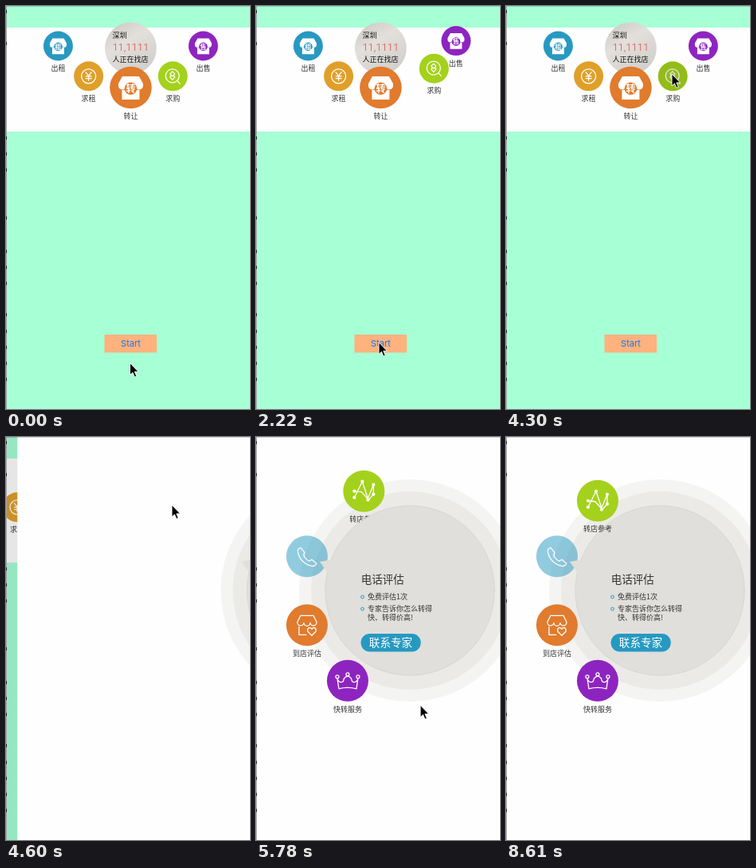
These frames come from a looping animation (306x504 px, 8710 ms). An HTML page:

```html
<!DOCTYPE html>
<html lang="zh">
<head>
<meta charset="utf-8">
<style>
html, body { margin: 0; width: 100%; height: 100%; overflow: hidden; background: #fff; }
svg { display: block; width: 306px; height: 504px; }
text { font-family: "Noto Sans CJK SC", "Noto Sans CJK", sans-serif; fill: #333; }
.mid { text-anchor: middle; }
.latin { font-family: Inter, Roboto, sans-serif; }
.count { font-family: Roboto, Inter, sans-serif; }
.line { fill: none; stroke: #fff; stroke-width: 1.3; stroke-linecap: round; stroke-linejoin: round; }
</style>
</head>
<body>
<svg id="stage" viewBox="0 0 306 504"></svg>
<script>
const LOOP = 8710, TICK = 148, WIDTH = 306;
const BLUE = '#2799c1', GOLD = '#e09f29', ORANGE = '#e17b2d', GREEN = '#a4d11c', PURPLE = '#8e24c0';

const circle = (x, y, r, fill, extra = '') => `<circle cx="${x}" cy="${y}" r="${r}" fill="${fill}" ${extra}/>`;
const rect = (x, y, w, h, fill, extra = '') => `<rect x="${x}" y="${y}" width="${w}" height="${h}" fill="${fill}" ${extra}/>`;
const text = (x, y, size, str, extra = '') => `<text x="${x}" y="${y}" font-size="${size}" ${extra}>${str}</text>`;
const line = (d, extra = '') => `<path class="line" d="${d}" ${extra}/>`;
const dots = (points, r) => points.map(([x, y]) => circle(x, y, r, '#fff')).join('');

const shop = (char, color, scale) => `<g transform="scale(${scale})">
  <path fill="#fff" d="M-10.5-14H10.5L15.5-5V-2A5.1 4.5 0 0 1 5.2-2A5.2 4.5 0 0 1-5.2-2A5.1 4.5 0 0 1-15.5-2V-5ZM-11 3H11V15H-11Z"/>
  ${circle(0, 1.2, 7.8, color)}
  ${text(0, 5.5, 12, char, 'class="mid" font-weight="700" style="fill:#fff"')}</g>`;
const yen = circle(0, 0, 9, 'none', 'class="line"') + line('M-3.5-5L0-.5L3.5-5M0-.5V5.5M-3.5 0H3.5M-3.5 2.7H3.5');
const search = circle(-.5, -.5, 8.5, 'none', 'class="line"') +
  line('M5.5 5.5L9 9.5M-.5-6L2.5-3L-.5 0L-3.5-3ZM-2-1.5L-3.5 1L-.5 4.5L2.5 1L1-1.5');
const chart = line('M-12 8L-2-12L5 9L12-8V4L6 11L-3 1L-12 0') +
  dots([[-12, 8], [-2, -12], [5, 11], [12, -8], [12, 4], [-12, 0]], 2.1);
const phone = line('M-8-11L-3-5Q-5-2-3 1Q0 5 3 6L6 4L12 9Q10 13 6 12Q-3 10-8 3Q-13-5-11-9Z');
const heartShop = line('M-8-12H8L12-4A4 4 0 0 1 4-3A4 4 0 0 1-4-3A4 4 0 0 1-12-4ZM-10 2V12H-1') +
  line('M6 13L1 8Q0 4 3 3Q5 3 6 5Q7 3 9 3Q12 4 11 8Z');
const crown = line('M-11 10L-13-3C-11 3-6 3-5-1C-5-4-2-5 0-6C2-5 5-4 5-1C6 3 11 3 13-3L11 10Q0 7-11 10Z') +
  [[-13, -5], [0, -8], [13, -5]].map(([x, y]) => circle(x, y, 2, 'none', 'class="line"')).join('');

// Angles are in degrees, clockwise on screen from the right.
const homeArc = { x: 156.4, y: -3.6, r: 105.6, from: -90, duration: 500 };
const serviceArc = { x: 195.5, y: 192.3, r: 138.4, from: 360, duration: 500 };
const homeItems = [
  { label: '出租', r: 18.5, color: BLUE, art: shop('租', BLUE, .68), to: 149.5, start: 1200 },
  { label: '求租', r: 18.5, color: GOLD, art: yen, to: 120, start: 1360 },
  { label: '求购', r: 18.5, color: GREEN, art: search, to: 60, start: 1803 },
  { label: '出售', r: 18.5, color: PURPLE, art: shop('售', PURPLE, .68), to: 30.5, start: 1781 },
  { label: '转让', r: 26.3, color: ORANGE, art: shop('转', ORANGE, 1), to: 90, start: 1520 },
];
const serviceItems = [
  { label: '转店参考', r: 26, color: GREEN, art: chart, to: 234.4, start: 5370 },
  { label: '', r: 26, color: BLUE, art: phone, to: 198.1, start: 5138, opacity: .5 },
  { label: '到店评估', r: 26, color: ORANGE, art: heartShop, to: 161.9, start: 4946 },
  { label: '快转服务', r: 26, color: PURPLE, art: crown, to: 125.6, start: 4760 },
];
const icon = i => `<g class="icon" opacity="${i.opacity || 1}">${circle(0, 0, i.r, i.color)}${i.art}
  ${text(0, i.r + 12.7, 9, i.label, 'class="mid"')}</g>`;

const bullet = y => circle(133.5, y, 1.9, 'none', `stroke="${BLUE}"`);
const edgeMarks = [7, 47, 165, 185, 205, 265, 307, 327, 347, 386, 407, 427, 447, 467];

const stage = document.getElementById('stage');
stage.innerHTML = `
<defs><linearGradient id="photo" x2=".6" y2="1">
  <stop stop-color="#c9c6c0"/><stop offset=".45" stop-color="#e3e0db"/><stop offset="1" stop-color="#d2d0cd"/>
</linearGradient></defs>
<g id="home">
  ${rect(0, 0, WIDTH, 504, '#a6ffd5')}${rect(0, 27, WIDTH, 130, '#fefefe')}
  ${circle(156.4, 52.8, 32.4, 'url(#photo)')}
  ${text(133.4, 40, 9, '深圳', 'style="fill:#111"')}
  ${text(133.4, 56, 13, '11,1111', 'class="count" font-weight="300" style="fill:#e8413c"')}
  ${text(133.4, 70, 9, '人正在找店', 'style="fill:#111"')}
  ${homeItems.map(icon).join('')}
  ${circle(209.2, 88, 18.5, '#000', 'id="press" opacity=".1"')}
  ${rect(123.5, 411, 65.5, 22.5, '#ffb27d')}
  ${text(156.5, 426, 11, 'Start', 'class="mid latin" style="fill:#1478f0"')}
</g>
${rect(0, 0, WIDTH, 504, '#000', 'id="shade"')}
<g id="service">
  ${rect(0, 0, WIDTH, 504, '#fefefe')}
  <g class="slide">${circle(193, 192, 139, '#f4f4f3')}${circle(193, 192, 124, '#ebeae7')}</g>
  <g id="menu">${serviceItems.map(icon).join('')}</g>
  <g id="panel" class="slide">
    ${circle(193, 192, 106.5, '#e0dfdb')}
    ${circle(193, 192, 106, 'none', 'stroke="#cfcec9" stroke-width=".8" stroke-dasharray="2 1"')}
    ${text(131.7, 183, 13.5, '电话评估')}
    ${bullet(200)}${text(140, 203.3, 9, '免费评估1次')}
    ${bullet(215)}${text(140, 218.3, 9, '专家告诉你怎么转得')}${text(140, 228.8, 9, '快、转得价高!')}
    ${rect(131.5, 246, 75.2, 22.5, BLUE, 'rx="11.2"')}
    ${text(169, 262.2, 13.6, '联系专家', 'class="mid" style="fill:#fff"')}
  </g>
  <g id="pointer" class="slide"><path d="M80 156L97 153L90 170Z" fill="#e0dfdb"/></g>
</g>
${rect(0, 0, WIDTH, 1, '#000', 'opacity=".18"')}${rect(0, 0, 1, 504, '#a3a3a3')}
${edgeMarks.map(y => rect(0, y - 2, 1, 4, '#222')).join('')}
<path id="cursor" d="M0 0V15L3.4 11.8L5.8 17.4L8.2 16.4L5.8 10.9H10.5Z" fill="#000" stroke="#fff" stroke-width=".9"/>`;

const find = id => document.getElementById(id);
const home = find('home'), service = find('service'), shade = find('shade'), press = find('press'), cursor = find('cursor');
const menu = find('menu'), panel = find('panel'), pointer = find('pointer');
const slides = service.querySelectorAll('.slide');
const homeIcons = home.querySelectorAll('.icon'), serviceIcons = service.querySelectorAll('.icon');

const progress = (t, start, end) => Math.min(1, Math.max(0, (t - start) / (end - start)));
const sineEase = p => (1 - Math.cos(Math.PI * p)) / 2;
const show = (el, on) => el.setAttribute('visibility', on ? 'visible' : 'hidden');
const move = (el, x, y = 0) => el.setAttribute('transform', `translate(${x} ${y})`);

function placeIcons(icons, items, arc, t) {
  items.forEach((item, i) => {
    const p = sineEase(progress(t, item.start, item.start + arc.duration));
    const a = (arc.from + (item.to - arc.from) * p) * Math.PI / 180;
    move(icons[i], arc.x + arc.r * Math.cos(a), arc.y + arc.r * Math.sin(a));
  });
}

const cursorPath = [
  [150, 155.5, 446.5], [740, 154, 420.5], [2223, 154, 420.5], [3410, 170, 99], [3850, 208, 85],
  [4600, 208, 85], [5187, 189.5, 241], [5340, 189.5, 241], [6518, 234, 494],
];
function cursorAt(t) {
  let [, x, y] = cursorPath[0];
  for (let i = 1; i < cursorPath.length; i++) {
    const [start, x0, y0] = cursorPath[i - 1], [end, x1, y1] = cursorPath[i];
    if (t < start) break;
    const p = progress(t, start, end);
    x = x0 + (x1 - x0) * p;
    y = y0 + (y1 - y0) * p;
  }
  return [x, y];
}

function draw(time) {
  // The picture advances in fixed ticks.
  const t = Math.floor(time / TICK + .04) * 148.2;

  placeIcons(homeIcons, homeItems, homeArc, t < 1170 ? LOOP : t);
  placeIcons(serviceIcons, serviceItems, serviceArc, t);
  serviceItems.forEach((item, i) => show(serviceIcons[i], t > item.start));
  // Once all icons have arrived, their labels lie over the panel.
  service.insertBefore(menu, t > serviceItems[0].start + serviceArc.duration ? pointer : panel);

  const pushed = 1 - (1 - progress(t, 4335, 4740)) ** 3;
  move(home, -94 * pushed);
  move(service, WIDTH * (1 - pushed));
  shade.setAttribute('opacity', .1 * pushed);
  show(press, t > 4290);
  const entered = sineEase(progress(t, 4415, 4865));
  slides.forEach(el => move(el, WIDTH * (1 - entered)));

  move(cursor, ...cursorAt(t));
  show(cursor, t < 6600);
}

const began = performance.now();
function loop() {
  draw((performance.now() - began) % LOOP);
  requestAnimationFrame(loop);
}
loop();
</script>
</body>
</html>
```
